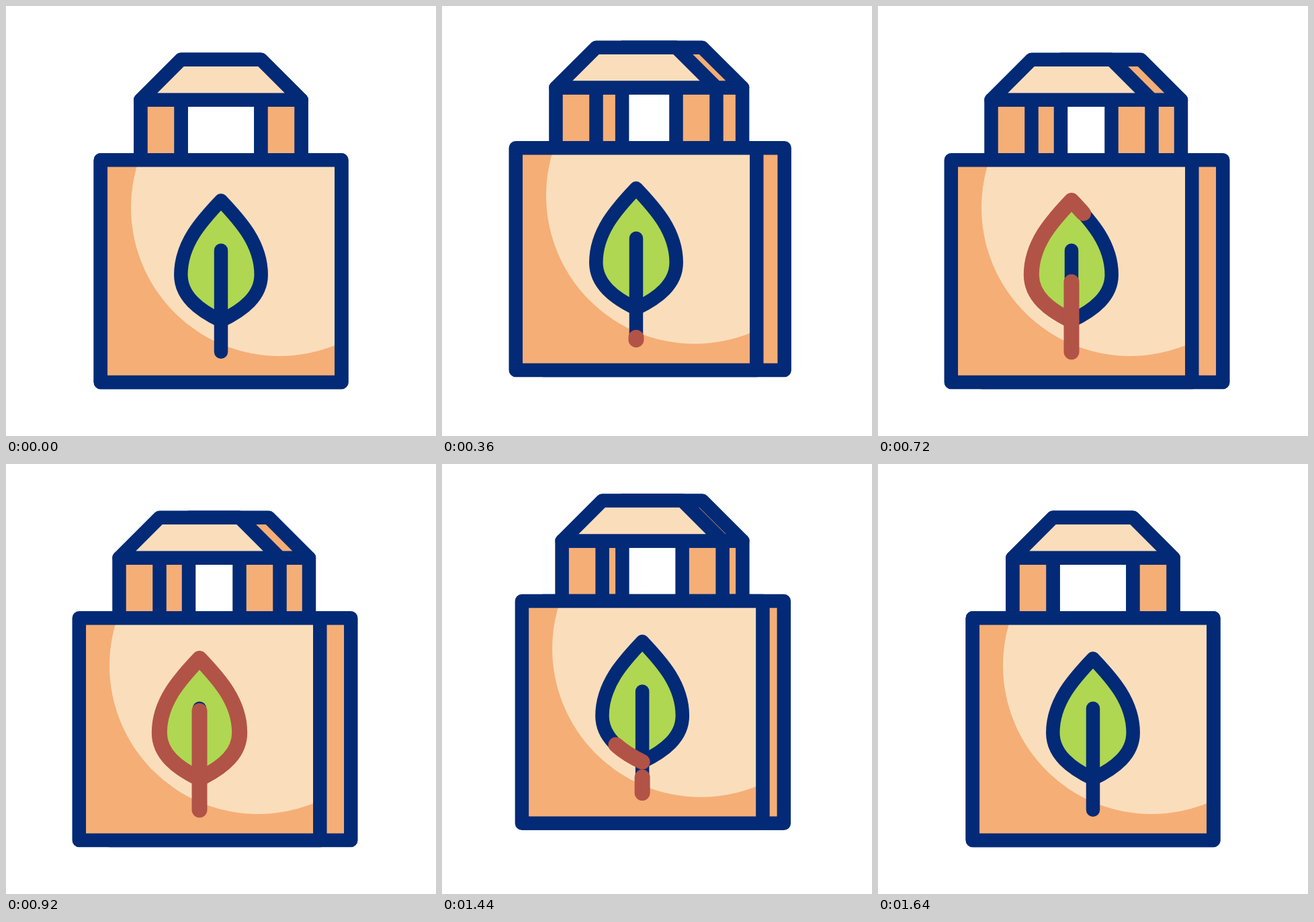
These frames come from a looping animation (640 by 640 pixels, 2000 ms). An HTML page:

```html
<!DOCTYPE html>
<html lang="en">
<head>
<meta charset="utf-8">
<title>Paper bag</title>
<style>
  html, body { margin: 0; width: 100%; height: 100%; overflow: hidden; background: #fff; }
  svg { display: block; width: 100%; height: 100%; }
  .line { stroke: #032a76; stroke-width: 20.5; stroke-linecap: round; stroke-linejoin: round; }
  .trace { fill: none; stroke: #b25347; stroke-width: 23; stroke-linecap: round; stroke-linejoin: round; }
  .none { fill: none; }
  .tan { fill: #f5ae76; }
  .pale { fill: #fadebc; }
  .green { fill: #afd751; }
</style>
</head>
<body>
<svg viewBox="0 0 640 640">
  <defs>
    <path id="flap" d="M200.5 139.7L260.5 79.8H379.5L439.5 139.7Z"/>
    <path id="straps" d="M200.5 139.7H260.5V229.3H200.5ZM379.5 139.7H439.5V229.3H379.5Z"/>
    <path id="box" d="M140.8 229.3H499.3V560.1H140.8Z"/>
    <path id="leaf" d="M320 468.5C287 452.5 260.3 432 260.3 400C260.3 354 291 320 320 289.5C349 320 379.7 354 379.7 400C379.7 432 353 452.5 320 468.5Z"/>
    <clipPath id="inside"><use href="#box"/></clipPath>
  </defs>
  <g id="bag">
    <g id="backHandle" class="line tan">
      <use href="#straps"/>
      <use href="#flap"/>
    </g>
    <use id="backBox" href="#box" class="line tan"/>
    <g id="front">
      <use href="#straps" class="line tan"/>
      <use href="#flap" class="line pale"/>
      <use href="#box" class="tan"/>
      <circle cx="407" cy="300" r="221" class="pale" clip-path="url(#inside)"/>
      <use href="#box" class="line none"/>
      <use href="#leaf" class="line green"/>
      <path class="line" d="M320 514.8V363.8"/>
      <path id="rim" class="trace" pathLength="1" d=""/>
      <path id="stem" class="trace" pathLength="1" d="M320 514.8V365.8"/>
    </g>
  </g>
</svg>
<script>
const LOOP = 2000, STEP = 40;
const $ = id => document.getElementById(id);
const clamp = x => Math.min(1, Math.max(0, x));
const smooth = p => p * p * (3 - 2 * p);
const ramp = (t, a, b) => smooth(clamp((t - a) / (b - a)));

// y of a cubic Bezier easing at x
function bezier(x1, y1, x2, y2) {
  const at = (a, b, u) => 3 * a * u * (1 - u) ** 2 + 3 * b * u * u * (1 - u) + u ** 3;
  return x => {
    let lo = 0, hi = 1;
    for (let i = 0; i < 24; i++) {
      const mid = (lo + hi) / 2;
      if (at(x1, x2, mid) < x) lo = mid; else hi = mid;
    }
    return at(y1, y2, (lo + hi) / 2);
  };
}
const land = bezier(0.167, 0.167, 0.667, 1);

// a hop lasts 320 ms, decelerating up and accelerating down
const hop = (t, start) => {
  const p = 1 - Math.abs(t - start - 160) / 160;
  return p > 0 ? land(p) : 0;
};

const move = (id, x, y = 0) => $(id).setAttribute('transform', `translate(${x} ${y})`);

function trim(id, part) {
  const s = $(id).style;
  s.display = part > 0.0001 ? '' : 'none';
  s.strokeDasharray = part < 1 ? `${part} 2` : 'none';
}

function draw(t) {
  const stay = 1 - ramp(t, 1320, 1640);
  move('bag', 0, -28.5 * (hop(t, 120) + hop(t, 1320)));
  move('front', -32 * ramp(t, 120, 388) * stay);
  move('backBox', 14 * ramp(t, 200, 440) * stay);
  move('backHandle', 11.5 * ramp(t, 235, 440) * stay);
  trim('stem', ramp(t, 302, 960) * (1 - ramp(t, 960, 1600)));
  trim('rim', ramp(t, 440, 960) * (1 - ramp(t, 960, 1560)));
}

$('rim').setAttribute('d', $('leaf').getAttribute('d'));
const began = performance.now();
function tick() {
  const t = (performance.now() - began) % LOOP;
  draw(Math.floor(t / STEP) * STEP);
  requestAnimationFrame(tick);
}
tick();
</script>
</body>
</html>
```
